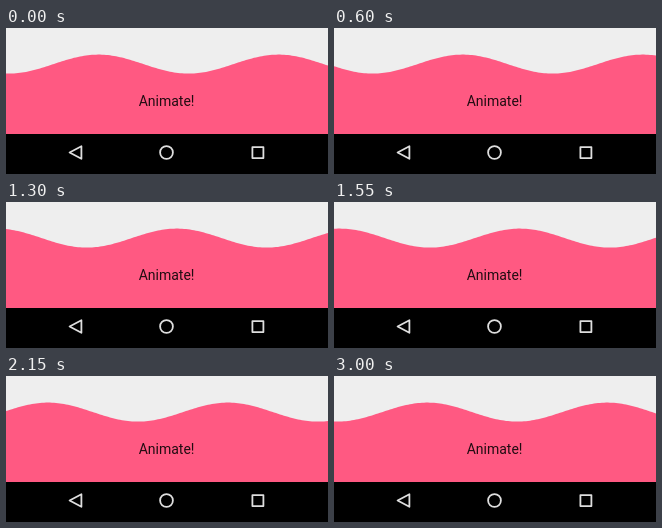
Animation of 322 by 146 pixels, one loop 3.05 s. Source, as an HTML page:

```html
<!DOCTYPE html>
<html lang="en">
<head>
<meta charset="utf-8">
<title>Wave</title>
<style>
  html, body { margin: 0; width: 100%; height: 100%; overflow: hidden; background: #eee; }
  svg { display: block; width: 322px; height: 146px; }
  text { font: 14px Roboto, sans-serif; fill: rgba(0, 0, 0, .87); }
  .nav { fill: none; stroke: #dedede; stroke-width: 1.8; stroke-linejoin: round; }
</style>
</head>
<body>
<svg viewBox="0 0 322 146">
  <rect width="322" height="146" fill="#eee"/>
  <path id="wave" fill="#ff5982"/>
  <text x="160.6" y="77.5" text-anchor="middle">Animate!</text>
  <rect y="106" width="322" height="40"/>
  <g class="nav">
    <path d="M63.6 124.5L75.4 118.2V130.8Z"/>
    <circle cx="160.5" cy="124.5" r="6.4"/>
    <rect x="246.4" y="119.1" width="11" height="11"/>
  </g>
</svg>
<script>
  const LOOP = 3050, STEP = 50;
  const WIDTH = 322, BOTTOM = 107;
  const WAVELENGTH = 180, SPEED = 0.0602;
  const MID = 36.1, AMPLITUDE = 9.5, FIRST_CREST = 92.5;
  const wave = document.getElementById('wave');
  const start = performance.now();

  function wavePath(crest) {
    let d = `M0 ${BOTTOM}`;
    for (let x = 0; x <= WIDTH; x += 2) {
      const y = MID - AMPLITUDE * Math.cos((x - crest) * 2 * Math.PI / WAVELENGTH);
      d += `L${x} ${y.toFixed(2)}`;
    }
    return d + `V${BOTTOM}Z`;
  }

  function draw(now) {
    const time = Math.max(0, now - start) % LOOP;
    const stepped = Math.floor(time / STEP) * STEP;
    wave.setAttribute('d', wavePath(FIRST_CREST + SPEED * stepped));
    requestAnimationFrame(draw);
  }

  draw(start);
</script>
</body>
</html>
```
